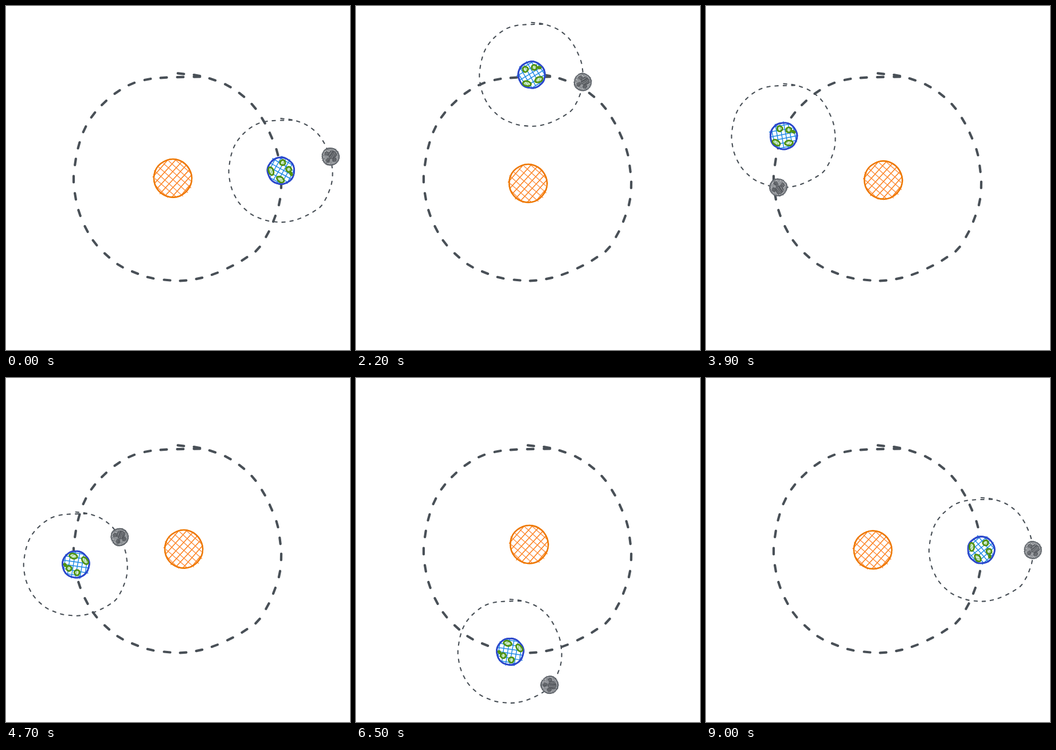
An HTML page for the animation above (9100 ms loop, 600 by 600 pixels).

```html
<!DOCTYPE html>
<html lang="en">
<head>
<meta charset="utf-8">
<title>Orbits</title>
<style>
html, body { margin: 0; width: 100%; height: 100%; overflow: hidden; background: #fff; }
svg { display: block; width: 100%; height: 100%; }
path { fill: none; stroke-linecap: round; stroke-linejoin: round; }
</style>
</head>
<body>
<svg viewBox="0 0 600 600">
  <g id="orbit"></g>
  <g id="moonOrbit"></g>
  <g id="sun"></g>
  <g id="earth"></g>
  <g id="moon"></g>
</svg>
<script>
const $ = id => document.getElementById(id);
const TAU = Math.PI * 2;

let seed = 11;
const rnd = () => (seed = seed * 16807 % 2147483647) / 2147483647;
const jit = a => (rnd() * 2 - 1) * a;
const fix = v => v.toFixed(2);

function add(parent, tag, attrs) {
  const el = document.createElementNS('http://www.w3.org/2000/svg', tag);
  for (const name in attrs) el.setAttribute(name, attrs[name]);
  parent.appendChild(el);
  return el;
}
const stroke = (parent, d, color, width, extra) =>
  add(parent, 'path', { d, stroke: color, 'stroke-width': width, ...extra });

// Hand-drawn closed ellipse, smoothed through the midpoints of jittered points
function roughEllipse(rx, ry, wobble, n = 18) {
  const pts = Array.from({ length: n }, (_, i) => {
    const a = i / n * TAU, j = jit(wobble);
    return [(rx + j) * Math.cos(a), (ry + j) * Math.sin(a)];
  });
  const mid = i => {
    const p = pts[i % n], q = pts[(i + 1) % n];
    return fix((p[0] + q[0]) / 2) + ' ' + fix((p[1] + q[1]) / 2);
  };
  let d = 'M' + mid(n - 1);
  pts.forEach((p, i) => d += `Q${fix(p[0])} ${fix(p[1])} ${mid(i)}`);
  return d + 'Z';
}

// Parallel chords of a circle with uneven ends
function hatch(r, gap, degrees, over = 1.5) {
  const a = degrees * TAU / 360, c = Math.cos(a), s = Math.sin(a);
  const at = (u, v) => fix(u * c - v * s) + ' ' + fix(u * s + v * c);
  let d = '';
  for (let v = -r + gap * 0.6; v < r; v += gap) {
    const h = Math.sqrt(r * r - v * v);
    d += `M${at(-h + jit(over), v + jit(0.8))}L${at(h + jit(over), v + jit(0.8))}`;
  }
  return d;
}

// Dash centres of the wobbly orbit, clockwise from the top, slightly overlapping
const orbit = [
  305,118, 333,121, 360,128, 387,139, 411,155, 432,175, 449,200, 462,226, 473,255, 478,284,
  480,312, 477,342, 468,371, 456,398, 439,424, 416,441, 391,455, 364,467, 337,475, 309,479,
  281,478, 252,474, 225,465, 199,453, 176,435, 155,413, 140,389, 128,361, 121,332, 118,302,
  121,272, 127,243, 137,215, 152,190, 171,169, 194,150, 219,136, 247,128, 275,125, 304,124,
  333,123.5
];
function dashes() {
  const n = orbit.length / 2, half = 5.4;
  const pt = i => {
    i = Math.max(0, Math.min(n - 1, i));
    return [orbit[2 * i] - 300, orbit[2 * i + 1] - 300];
  };
  let d = '';
  for (let i = 0; i < n; i++) {
    const [x, y] = pt(i), p = pt(i - 1), q = pt(i + 1);
    const a = Math.atan2(q[1] - p[1], q[0] - p[0]);
    const dx = half * Math.cos(a), dy = half * Math.sin(a);
    d += `M${fix(x - dx)} ${fix(y - dy)}L${fix(x + dx)} ${fix(y + dy)}`;
  }
  return d;
}

function drawSun(g) {
  add(g, 'circle', { r: 33, fill: '#fff' });
  stroke(g, hatch(33, 9.6, -48, 3), '#fd7e14', 1.5);
  stroke(g, hatch(33, 9.6, 42, 3), '#fd8a3a', 1.3);
  for (let i = 0; i < 2; i++) stroke(g, roughEllipse(33.6, 33.6, 0.5), '#ee7800', 2.2);
}

function drawEarth(g) {
  add(g, 'circle', { r: 24, fill: '#fff' });
  stroke(g, hatch(23, 7.6, -41, 3), '#228be6', 1.5);
  stroke(g, hatch(23, 7.6, 49, 3), '#228be6', 1.5);
  for (let i = 0; i < 2; i++) stroke(g, roughEllipse(23.4, 23.4, 0.7, 26), '#2c48cc', 2.6);
  // x, y, rx, ry, tilt
  const lands = [
    [-16.5, -5.5, 4.4, 7.4, 4], [7.5, -12.5, 5, 4.8, 0],
    [13.5, 2.5, 4.6, 4.6, 0], [-6, 14, 7.4, 4.6, 52], [15, 11, 1.6, 3, 10]
  ];
  for (const [x, y, rx, ry, tilt] of lands) {
    const land = add(g, 'g', { transform: `translate(${x} ${y}) rotate(${tilt})` });
    add(land, 'ellipse', { rx, ry, fill: '#d3ebcf' });
    stroke(land, hatch(Math.min(rx, ry), 3.6, -41, 0.5), '#69b95c', 0.8);
    stroke(land, roughEllipse(rx, ry, 0.5, 10), '#4f910f', 2.8);
  }
}

function drawMoon(g) {
  add(g, 'circle', { r: 15, fill: '#c9cacc' });
  for (const a of [-41, 49, 10]) stroke(g, hatch(15, 2.4, a, 1.5), '#7d8186', 0.8);
  const craters = [[4, -2, 7], [-6, 5, 3.5], [5, 7, 3.5], [-5, -7, 3]];
  for (const [x, y, r] of craters) {
    const crater = add(g, 'g', { transform: `translate(${x} ${y})` });
    add(crater, 'circle', { r, fill: '#6d7074', opacity: 0.5 });
    stroke(crater, hatch(r, 2.2, -41), '#4b4f54', 1);
    stroke(crater, roughEllipse(r, r, 0.9, 9), '#55595e', 0.9);
  }
  for (let i = 0; i < 3; i++) stroke(g, roughEllipse(15.2, 15.2, 1.1, 14), '#5b6066', 0.9);
}

const dashPath = dashes();
stroke($('orbit'), dashPath, '#495057', 4.2, { transform: 'translate(300 300)' });
stroke($('moonOrbit'), dashPath, '#495057', 4.2, { transform: 'scale(.5)' });
drawSun($('sun'));
drawEarth($('earth'));
drawMoon($('moon'));

const polar = (x, y, r, degrees) => {
  const a = degrees * TAU / 360;
  return [x + r * Math.cos(a), y - r * Math.sin(a)];
};
const place = (id, [x, y], spin = 0) =>
  $(id).setAttribute('transform', `translate(${fix(x)} ${fix(y)}) rotate(${-spin})`);

function render(ms) {
  const step = Math.max(1, Math.floor(ms % 9100 / 100));
  const earth = polar(300, 300, 180, step * 4);
  const sun = polar(300.6, 299.8, 9.6, step * 4 + 180);
  place('sun', sun);
  place('earth', earth, step * 20);
  place('moonOrbit', earth);
  place('moon', polar(...earth, 90, step * 16), step * 16);
}

let start;
function tick(now) {
  start ??= now;
  render(now - start);
  requestAnimationFrame(tick);
}
render(0);
requestAnimationFrame(tick);
</script>
</body>
</html>
```
